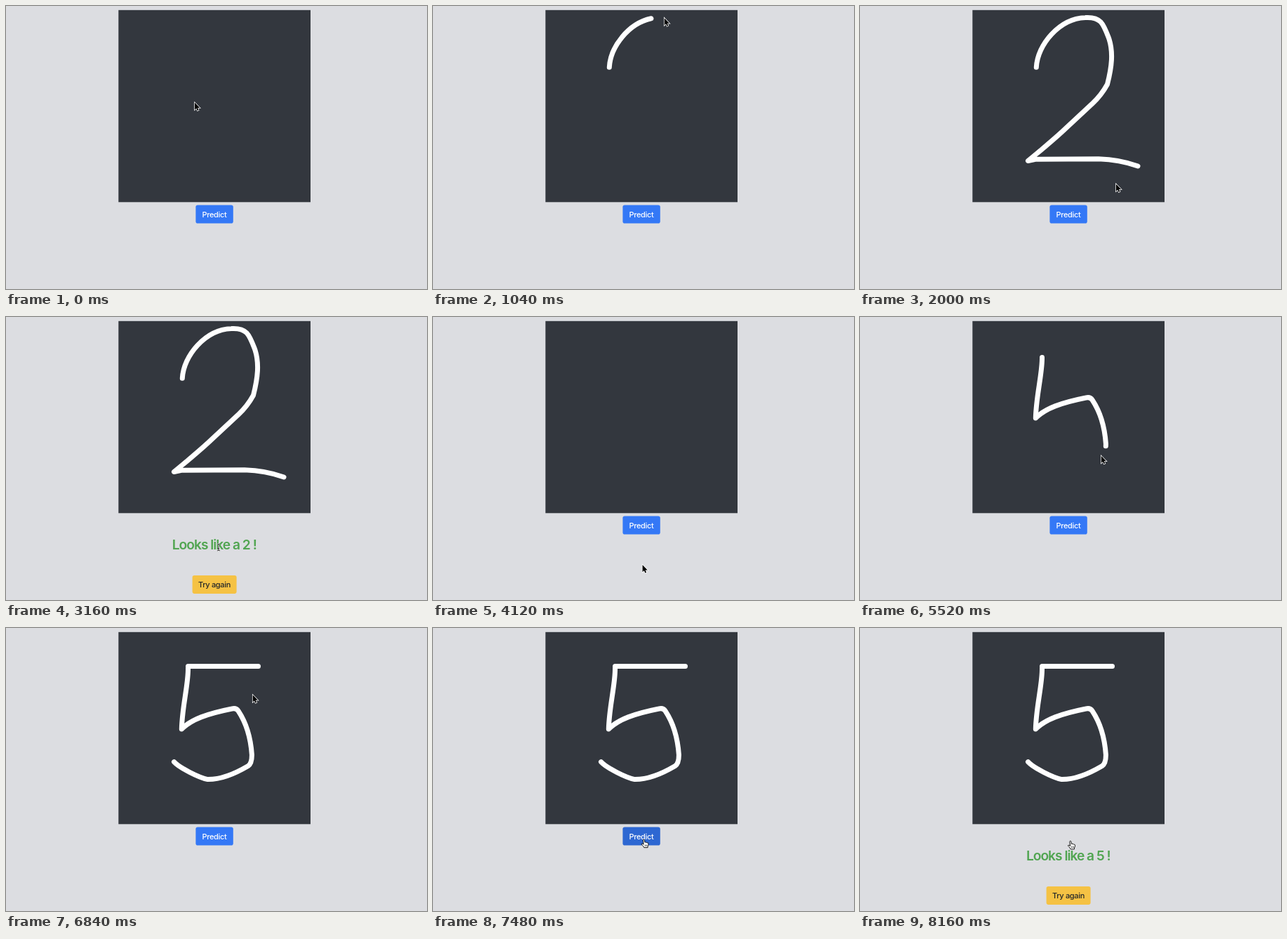
An HTML page that plays this animation: 600 px wide and 403 px high, repeating every 8360 ms.

```html
<!DOCTYPE html>
<html lang="en">
<head>
<meta charset="utf-8">
<title>Digit guess</title>
<style>
  html, body { margin: 0; width: 100%; height: 100%; overflow: hidden; background: #dcdde1; }
  svg { position: absolute; left: 0; top: 0; }
  text { font-family: Inter, Roboto, sans-serif; font-optical-sizing: none; text-anchor: middle; }
  .btn { font-size: 11px; font-weight: 500; letter-spacing: -.33px; }
  .btn rect { paint-order: stroke; }
  #predict rect { fill: #3478f6; }
  #predict text { fill: #fff; }
  #predict.hover rect { fill: #2d67d2; }
  #predict.focus rect { stroke: rgba(52, 120, 246, .5); stroke-width: 4.4px; }
  #again rect { fill: #f5c244; }
  #again text { fill: #212529; }
  #again.hover rect { fill: #d9a93a; }
  #again.focus rect { stroke: rgba(245, 194, 68, .5); stroke-width: 4.4px; }
  #guess { font-size: 19.2px; font-weight: 600; letter-spacing: -1px; fill: #51a551; }
  #legs { fill: none; stroke: #fff; stroke-width: 7px; stroke-linecap: round; stroke-linejoin: round; }
  #arrow { stroke: #fff; stroke-width: 1.7px; paint-order: stroke; }
  #hand { fill: #fff; stroke: #111; }
  #hand .fold { stroke-width: .6px; }
  #beam { fill: none; stroke: #111; stroke-width: .9px; }
  #beam .halo { stroke: #fff; stroke-width: 2px; }
</style>
</head>
<body>
<svg width="600" height="403" viewBox="0 0 600 403">
  <rect x="160.3" y="5.8" width="273.7" height="273.5" fill="#33373e"/>
  <g id="predict" class="btn">
    <rect x="270.4" y="283.5" width="53.4" height="26" rx="2.8"/>
    <text x="297" y="300.7">Predict</text>
  </g>
  <text id="guess" x="296.8" y="331"></text>
  <g id="again" class="btn">
    <rect x="265.6" y="367.9" width="63" height="26" rx="2.8"/>
    <text x="297" y="385">Try again</text>
  </g>
  <g id="legs"></g>
  <g id="pointer">
    <path id="arrow" d="M0 0V11.6L2.6 9.2L4.3 13L6.2 12.2L4.6 8.5H8.2Z" transform="scale(.88)"/>
    <g id="hand">
      <path d="M-1.2 1.2Q-1.1 .2 -.2 .2Q.8 .2 .9 1.2L1.3 4.3Q2.3 3.5 3 4.6Q4.2 4 4.7 5.1Q6.3 4.7 6.5 6.2
        Q6.7 8.5 5.5 10V11.8H.2Q-.6 9.8 -2.2 8.5Q-3.8 7.2 -3.4 6.4Q-2.5 5.7 -.4 7.3Z"/>
      <path class="fold" d="M1.5 7.7V10M3 7.7V10M4.4 7.7V10"/>
    </g>
    <g id="beam">
      <path class="halo" d="M-2 -5Q0 -5 0 -3.8Q0 -5 2 -5M0 -4V4M-2 5Q0 5 0 3.8Q0 5 2 5"/>
      <path d="M-2 -5Q0 -5 0 -3.8Q0 -5 2 -5M0 -4V4M-2 5Q0 5 0 3.8Q0 5 2 5M-1 1.8H1"/>
    </g>
  </g>
</svg>
<script>
const LOOP = 8360, CLEARED = 3640;
const LAG = 36;     // ink trails the pointer
const PRESS = 100;  // how long a button keeps its focus ring

const results = [
  { from: 2760, to: CLEARED, digit: 2 },
  { from: 7760, to: LOOP, digit: 5 }
];

const smooth = u => u * u * (3 - 2 * u);
const easeIn = u => u * u;
const easeOut = u => u * (2 - u);
const pen = u => u ** 1.4;

const two = "M251.3 87.3C253 55 284 18 321 16.5C344 15 347 26 355 47C361 66 359 86 352.5 111.5" +
  "Q344 127 331.5 138.6L288.5 178.6Q274 192 239.5 220.5L250 218.3L340 217.7Q370 218.5 396 228";
const five = "M259.5 57.5C260 80 251 112 250.3 144C264 130 287 122 322 115Q328 113.5 331 118" +
  "C343 136 349 160 350.4 180.6Q350.5 193 345 196.5Q312 216 287.5 215.6C275 213 247 199 239.5 190.6";
const bar = "M259.5 54.5H359.5";

const $ = id => document.getElementById(id);
const show = (el, on) => el.style.display = on ? "" : "none";

// One stretch of pointer travel; ink legs leave a line behind.
function leg(t0, t1, ease, d, ink = false) {
  const path = document.createElementNS("http://www.w3.org/2000/svg", "path");
  path.setAttribute("d", d);
  $("legs").append(path);
  show(path, false);
  const length = path.getTotalLength();
  const reach = t => length * ease(Math.max(0, Math.min(1, (t - t0) / (t1 - t0))));
  return { t0, t1, ink, path, length, reach };
}

const legs = [
  leg(60, 660, smooth, "M269 137L251 87"),
  leg(740, 1640, pen, two, true),
  leg(1760, 2383, smooth, "M396 228L365 253L299 298"),
  leg(2920, 3529, smooth, "M299 298L303 327L298 383"),
  leg(4000, 4200, easeIn, "M298 383L299 355L290 300"),
  leg(4200, 4560, easeOut, "M290 300L259 57"),
  leg(4709, 5762, pen, five, true),
  leg(5900, 6220, smooth, "M239 190L259 54"),
  leg(6280, 6600, pen, bar, true),
  leg(6775, 7555, easeOut, "M359 54L352 93.5L300 302.5")
];

const resultAt = t => results.find(r => t >= r.from && t < r.to);
const over = (p, x, y, w, h) => p.x >= x && p.x <= x + w && p.y >= y && p.y <= y + h;

function pointerKind(p, result) {
  const button = result ? [265, 368, 64, 26] : [270, 283, 54, 27];
  if (over(p, ...button)) return "hand";
  return result && over(p, 236, 314, 122, 22) ? "beam" : "arrow";
}

function drawInk(t) {
  const inkTime = t - LAG;
  for (const l of legs.filter(l => l.ink)) {
    show(l.path, inkTime >= l.t0 && (t < CLEARED || l.t0 > CLEARED));
    l.path.style.strokeDasharray = l.reach(inkTime) + " " + (l.length + 10);
  }
}

function render(t) {
  const result = resultAt(t);
  const current = legs.filter(l => l.t0 <= t).pop() || legs[0];
  const head = current.path.getPointAtLength(current.reach(t));
  // The pointer shape only updates while the pointer moves.
  const kind = pointerKind(head, resultAt(Math.min(t, current.t1)));
  const hovered = pointerKind(head, result) === "hand";
  const pressed = end => t >= end - PRESS && t < end;

  drawInk(t);
  show($("predict"), !result);
  show($("again"), result);
  $("guess").textContent = result ? `Looks like a ${result.digit} !` : "";
  for (const id of ["predict", "again"]) $(id).classList.toggle("hover", hovered);
  $("predict").classList.toggle("focus", results.some(r => pressed(r.from)));
  $("again").classList.toggle("focus", pressed(CLEARED));

  for (const id of ["arrow", "hand", "beam"]) show($(id), id === kind);
  $("pointer").setAttribute("transform", `translate(${head.x} ${head.y + .6})`);
}

const start = performance.now();
function tick() {
  render((performance.now() - start) % LOOP);
  requestAnimationFrame(tick);
}
tick();
</script>
</body>
</html>
```
